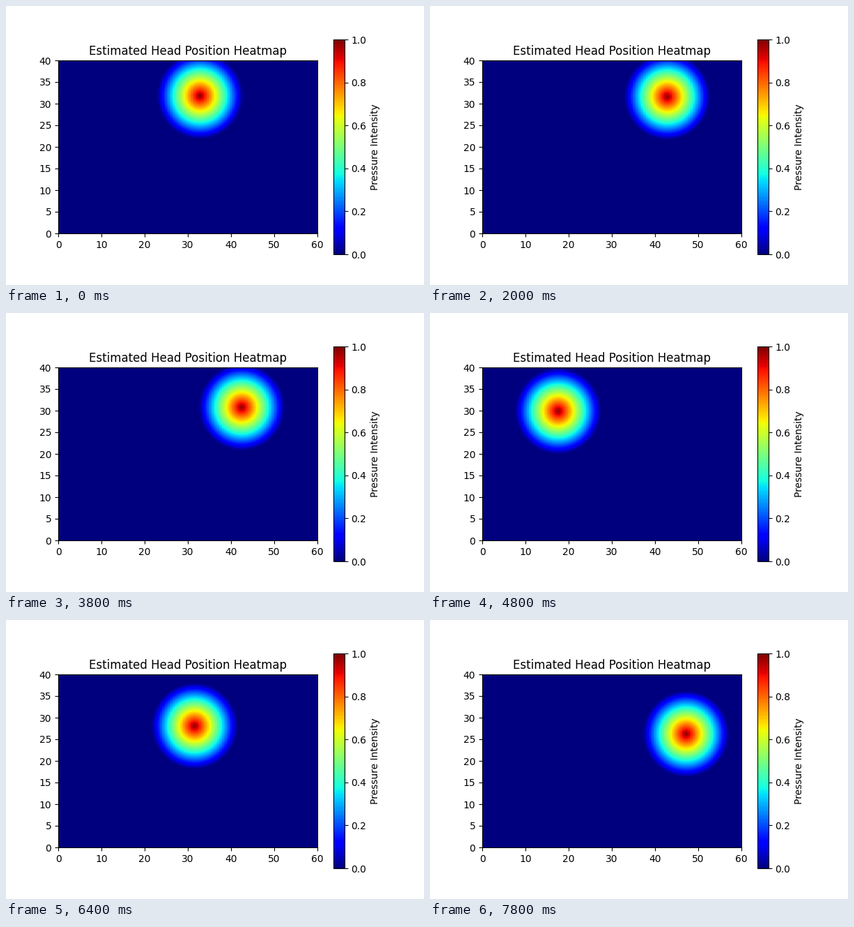
Animation of 600x400 px, one loop 8000 ms. Source, as a matplotlib script:

```python
import numpy as np
import matplotlib.pyplot as plt
from matplotlib.animation import FuncAnimation

FRAMES, STEP_MS = 40, 200
WIDTH, HEIGHT, REACH = 60, 40, 10

# Turning points of the head: seconds, x, y
TURNS = [
    (0.0, 32.75, 31.8),
    (0.6, 21.45, 29.05),
    (2.0, 42.85, 31.6),
    (2.4, 51.3, 30.0),
    (3.0, 45.3, 31.5),
    (3.6, 45.8, 31.0),
    (4.6, 11.2, 28.6),
    (4.8, 17.4, 29.9),
    (5.6, 18.0, 20.6),
    (6.4, 31.5, 28.05),
    (6.8, 41.0, 17.7),
    (7.2, 51.0, 26.8),
    (7.8, 47.25, 26.2),
]

grid_x, grid_y = np.meshgrid(np.linspace(0, WIDTH, 100),
                             np.linspace(0, HEIGHT, 100))


def ease(u):
    return (1 - np.cos(np.pi * u)) / 2


def head_position(t):
    for (t0, x0, y0), (t1, x1, y1) in zip(TURNS, TURNS[1:]):
        if t <= t1:
            break
    k = ease(min((t - t0) / (t1 - t0), 1))
    return x0 + (x1 - x0) * k, y0 + (y1 - y0) * k


def pressure(x, y):
    distance = np.hypot(grid_x - x, grid_y - y)
    return np.clip(1 - distance / REACH, 0, 1)


fig, ax = plt.subplots(figsize=(6, 4), dpi=100)
heatmap = ax.imshow(pressure(*head_position(0)), cmap="jet", vmin=0, vmax=1,
                    origin="lower", extent=(0, WIDTH, 0, HEIGHT))
fig.colorbar(heatmap, ax=ax, label="Pressure Intensity")
ax.set_title("Estimated Head Position Heatmap")


def update(frame):
    heatmap.set_data(pressure(*head_position(frame * STEP_MS / 1000)))
    return [heatmap]


anim = FuncAnimation(fig, update, frames=FRAMES, interval=STEP_MS,
                     repeat=True, repeat_delay=0)
plt.show()
```
